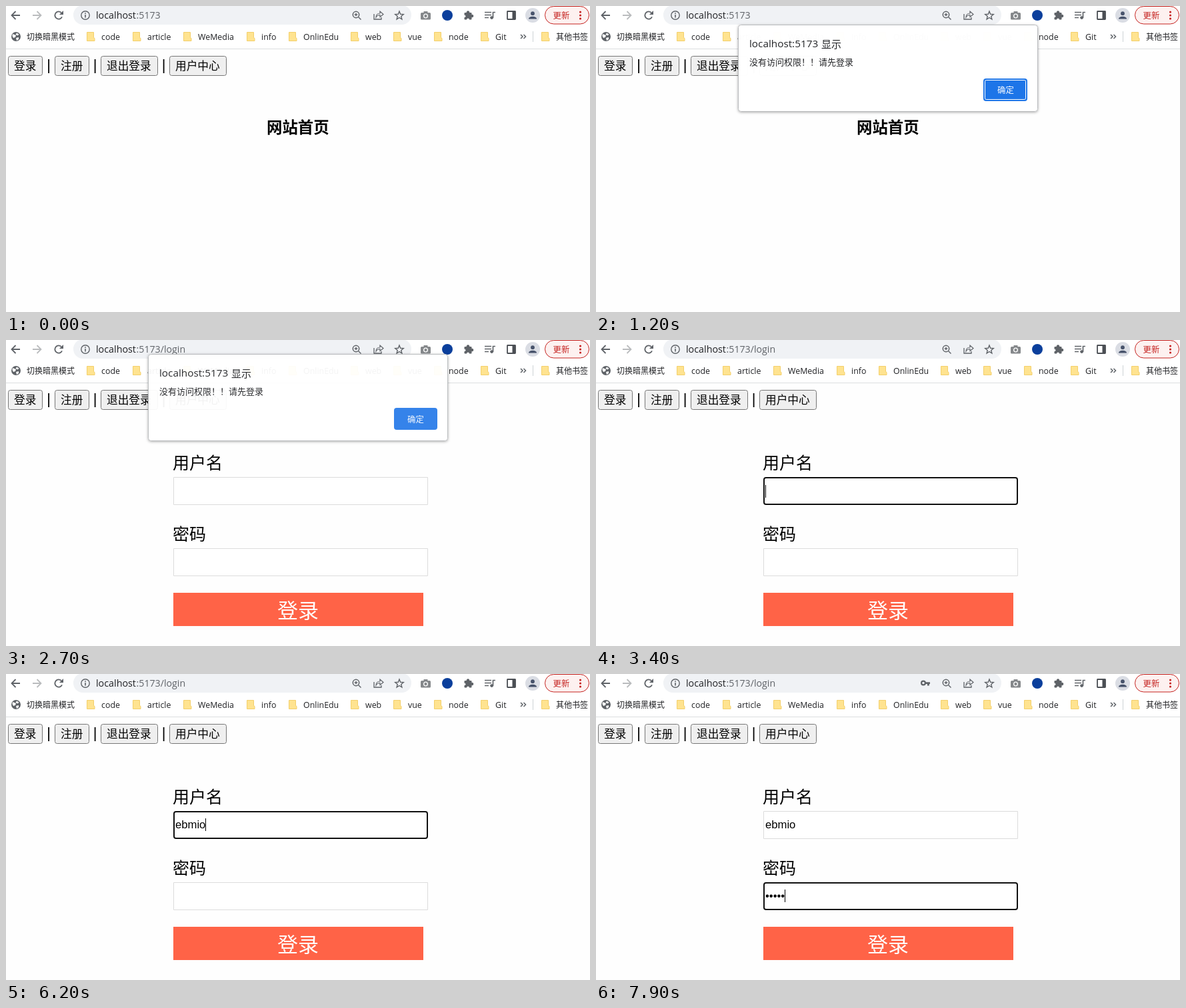
These frames come from a looping animation (876x460 px, 8 s). An HTML page with a canvas:

```html
<!DOCTYPE html>
<html lang="zh-CN">
<head>
<meta charset="utf-8">
<title>登录</title>
<style>
html, body { margin: 0; width: 100%; height: 100%; overflow: hidden; background: #fff; }
canvas { display: block; width: 876px; height: 460px; }
</style>
</head>
<body>
<canvas id="stage" width="876" height="460"></canvas>
<script>
const ctx = document.getElementById('stage').getContext('2d');
const LOOP = 8000;
const UI = '"Open Sans", "Noto Sans CJK SC", "Noto Sans CJK", sans-serif';
const CJK = '"Noto Sans CJK SC", "Noto Sans CJK", sans-serif';
const FIELD = '"Liberation Sans", Arial, sans-serif';
const GREY = '#5f6368', INK = '#202124', BLUE = '#1a73e8', RED = '#c5221f';

const USER = 'ebmio';
const userKeys = [4300, 4700, 4900, 5100, 5200];
const passKeys = [6900, 7100, 7400, 7600, 7900];

const within = (t, from, to) => t >= from && t < to;
const typed = (keys, t) => keys.filter(k => t >= k).length;

function text(str, x, y, size, color = '#000', family = UI, weight = 400) {
  ctx.font = `${weight} ${size}px ${family}`;
  ctx.fillStyle = color;
  ctx.fillText(str, x, y);
}

// CJK text placed by the vertical middle of its glyphs, on a whole-pixel baseline
function han(str, x, mid, size, color, weight) {
  text(str, x, Math.round(mid + size * 0.38), size, color, CJK, weight);
}

function box(x, y, w, h, r, fill, line, width = 1) {
  ctx.beginPath();
  ctx.roundRect(x, y, w, h, r);
  if (fill) { ctx.fillStyle = fill; ctx.fill(); }
  if (line) { ctx.strokeStyle = line; ctx.lineWidth = width; ctx.stroke(); }
}

function rect(x, y, w, h, color) {
  ctx.fillStyle = color;
  ctx.fillRect(x, y, w, h);
}

function dot(x, y, r, color) {
  ctx.beginPath();
  ctx.arc(x, y, r, 0, Math.PI * 2);
  ctx.fillStyle = color;
  ctx.fill();
}

function ring(x, y, r, color, width) {
  ctx.beginPath();
  ctx.arc(x, y, r, 0, Math.PI * 2);
  ctx.strokeStyle = color;
  ctx.lineWidth = width;
  ctx.stroke();
}

function line(d, color = GREY, width = 1.6) {
  ctx.strokeStyle = color;
  ctx.lineWidth = width;
  ctx.stroke(new Path2D(d));
}

function shape(d, color = GREY) {
  ctx.fillStyle = color;
  ctx.fill(new Path2D(d));
}

function star(cx, cy, outer, inner) {
  ctx.beginPath();
  for (let i = 0; i < 10; i++) {
    const a = i * Math.PI / 5 - Math.PI / 2, r = i % 2 ? inner : outer;
    ctx.lineTo(cx + r * Math.cos(a), cy + r * Math.sin(a));
  }
  ctx.closePath();
  ctx.strokeStyle = GREY;
  ctx.lineWidth = 1.4;
  ctx.stroke();
}

function folder(x) {
  const d = `M${x + .5} 39.5h10v8l1.5 1v4h-11.5z`;
  shape(d, '#ffe390');
  line(d, '#f3cf6b', 1);
}

function navIcons() {
  line('M21 14H9M14.5 8L8.5 14L14.5 20', GREY, 1.8);
  line('M40 14H52M46.5 8L52.5 14L46.5 20', '#babcbe', 1.8);
  ctx.beginPath();
  ctx.arc(79, 14, 5.6, 0.45, 5.5);
  ctx.strokeStyle = GREY;
  ctx.lineWidth = 1.8;
  ctx.stroke();
  shape('M86 7v6h-6z');
}

function addressBar(t) {
  box(101, -1, 507, 29, 14.5, '#f0f2f5');
  ring(119, 14, 6.2, GREY, 1.4);
  rect(118.2, 13, 1.6, 4.5, GREY);
  rect(118.2, 10.2, 1.6, 1.7, GREY);
  text('localhost', 135, 19, 14.3, INK);
  text(':5173' + (t >= 2700 ? '/login' : ''), 195.5, 19, 14.2, GREY);

  if (t >= 6900) {
    ring(491, 13.5, 2.9, GREY, 2.2);
    shape('M494 12.3h7v2.6h-1.2v2.6h-2.8v-2.6h-3z');
  }
  ring(525, 13, 4.7, GREY, 1.5);
  line('M528.5 16.5L532.5 20.5M522.7 13h4.6M525 10.7v4.6', GREY, 1.4);
  line('M552 12v8h11v-3', GREY, 1.3);
  line('M555 17c0-4 3-6 6-6V8l5 4.5l-5 4v-3c-3 0-5 1.5-6 3.5z', GREY, 1.2);
  star(590, 14.6, 6.6, 2.9);
}

function extensionIcons() {
  box(622, 10, 15, 10.5, 1.5, '#85888b');
  rect(626.5, 8, 6, 3, '#85888b');
  dot(629.5, 15, 3.5, '#fff');
  dot(629.5, 15, 2.2, '#85888b');

  dot(662, 14, 8, '#0b3f9c');

  box(687.5, 10, 11, 10.5, 1, GREY);
  dot(693, 9.5, 2.3, GREY);
  dot(699, 15, 2.3, GREY);
  dot(687.5, 15.3, 1.9, '#fff');
  dot(693, 20.5, 1.9, '#fff');

  line('M718 9.5h10M718 13.5h10M718 17.5h6M730.5 18V9.5h3.5', GREY, 1.7);
  dot(728.6, 17.6, 2.4, GREY);

  box(752, 8, 12, 12, 0.5, null, '#4b4f54', 1.8);
  rect(759.5, 8, 4.5, 12, '#4b4f54');

  dot(790, 14, 11, '#dadde4');
  dot(790, 11.2, 2.9, '#47536b');
  shape('M784 19.5c0-5 12-5 12 0z', '#47536b');

  box(808.5, 0.5, 66, 26.5, 13.2, '#fdf1f0', RED);
  han('更新', 820.5, 14.3, 12.4, RED);
  for (const y of [9, 14, 19]) dot(861.5, y, 1.6, RED);
}

function bookmarks() {
  dot(15, 46, 7, GREY);
  shape('M10 42l5 2l-1 3l-3 1l-1.5-3zM16 40.5l3.5 2l-2 2l-3-1.5zM15 48l4-1v3l-3 2z', '#fff');
  han('切换暗黑模式', 31, 46.5, 12, INK);
  const names = [[121, 'code'], [190, 'article'], [266, 'WeMedia'], [361, 'info'], [424, 'OnlinEdu'],
    [517, 'web'], [581, 'vue'], [642, 'node'], [712, 'Git']];
  for (const [x, name] of names) {
    folder(x);
    text(name, x + 22, 51, 12.4, INK);
  }
  line('M772 43l3 3l-3 3M776.5 43l3 3l-3 3', GREY, 1.5);
  rect(790, 38, 1, 16, '#cfd2d6');
  folder(803);
  han('其他书签', 825, 46.5, 12, INK);
}

function pageButton(label, x, w, hover) {
  box(x + .5, 75.5, w - 1, 29, 3, hover ? '#e5e5e5' : '#efefef', hover ? '#4f4f4f' : '#767676');
  han(label, x + 9, 90, 16.67);
}

function pageNav(t) {
  pageButton('登录', 3, 52);
  pageButton('注册', 73, 52);
  pageButton('退出登录', 142, 86);
  pageButton('用户中心', 245, 86, within(t, 600, 2700));
  for (const x of [61.2, 130.7, 233.7]) text('|', x, 96, 22, '#000', FIELD);
}

function field(y, value, focused, caret) {
  if (focused) box(252, y + 1, 380, 40, 3, '#fff', '#101010', 2);
  else box(251.5, y + .5, 381, 41, 0, '#fff', '#dcdcdc');
  text(value, 254, y + 26, 16.67, '#000', FIELD);
  if (caret) {
    const x = Math.floor(254 + ctx.measureText(value).width);
    rect(x, y + (value || y > 300 ? 11 : 12), 1, 19, '#000');
  }
}

function loginForm(t) {
  const onUser = within(t, 3400, 6300), onPass = t >= 6300;
  han('用户名', 250, 184.5, 25);
  field(206, USER.slice(0, typed(userKeys, t)), onUser,
    onUser && !within(t, 3900, 4300) && !within(t, 5800, 6200));
  han('密码', 250, 291, 25);
  field(313, '•'.repeat(typed(passKeys, t)), onPass, onPass && !within(t, 6800, 6900));
  rect(251, 380, 375, 50, '#ff6347');
  han('登录', 407, 406.5, 31, '#fff');
}

function dialogPose(t) {
  if (t < 1000 || t >= 2900) return null;
  if (t < 1100) return { alpha: 0.35, dy: -7 };
  if (t < 1200) return { alpha: 0.85, dy: -2 };
  if (t < 2700) return { alpha: 0.985, dy: 0 };
  return t < 2800 ? { alpha: 0.95, dy: -7 } : { alpha: 0.4, dy: -15 };
}

// The shadow is clipped to the outside so that a fading panel stays white
function dialogPanel() {
  ctx.save();
  ctx.beginPath();
  ctx.rect(200, 10, 476, 165);
  ctx.roundRect(213.5, 28.5, 449, 130, 4);
  ctx.clip('evenodd');
  ctx.shadowColor = 'rgba(0,0,0,.4)';
  ctx.shadowBlur = 4;
  ctx.shadowOffsetY = 1;
  box(213.5, 28.5, 449, 130, 4, '#fff');
  ctx.restore();
  box(213.5, 28.5, 449, 130, 4, '#fff', '#b9bbbd');
}

function confirmButton(t) {
  const focused = t < 2700, pressed = within(t, 2600, 2700);
  const color = t < 2400 ? BLUE : pressed ? '#2d7ae0' : '#2b7de9';
  if (focused) box(581, 109, 66, 34, 4, color);
  else box(582, 109, 65, 33, 4, color);
  if (pressed) {
    ctx.save();
    ctx.beginPath();
    ctx.rect(584, 112, 60, 28);
    ctx.clip();
    dot(615, 126, 25, '#4a89dc');
    ctx.restore();
  }
  if (focused) box(583.5, 111.5, 61, 29, 2, null, '#fff');
  han('确定', 602, 126.5, 12.4, '#fff');
}

function dialog(t) {
  const pose = dialogPose(t);
  if (!pose) return;
  ctx.save();
  ctx.globalAlpha = pose.alpha;
  ctx.translate(0, pose.dy);
  dialogPanel();
  text('localhost:5173', 230, 62, 15.3, INK);
  han('显示', 338, 57, 15, INK);
  han('没有访问权限！！请先登录', 230, 84, 13, INK);
  confirmButton(t);
  ctx.restore();
}

function draw(t) {
  rect(0, 0, 876, 460, '#fefefe');
  rect(0, 0, 876, 64, '#fff');
  navIcons();
  addressBar(t);
  extensionIcons();
  bookmarks();
  rect(0, 64, 876, 1, '#dcdee0');
  pageNav(t);
  if (t < 2700) han('网站首页', 391, 182, 23.4, '#000', 700);
  else loginForm(t);
  dialog(t);
}

const start = performance.now();
function tick() {
  draw((performance.now() - start) % LOOP);
  requestAnimationFrame(tick);
}
tick();
</script>
</body>
</html>
```
